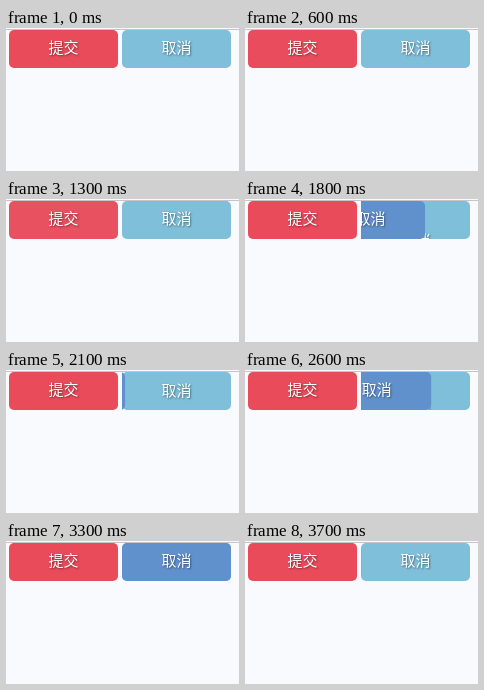
These frames come from a looping animation (233 by 143 pixels, 4200 ms). An HTML page:

```html
<!DOCTYPE html>
<html lang="zh">
<head>
<meta charset="utf-8">
<style>
  html, body { margin: 0; width: 100%; height: 100%; overflow: hidden; background: #f8fafd; }
  svg { display: block; }
  text {
    font: 500 15px "Noto Sans CJK SC", "Noto Sans CJK", sans-serif;
    fill: #fff;
    text-anchor: middle;
    text-shadow: 1px 1px 2px rgba(0, 0, 0, .45);
  }
</style>
</head>
<body>
<svg width="233" height="143" viewBox="0 0 233 143">
  <defs>
    <clipPath id="cancelBox"><rect x="116" y="2" width="109" height="38"/></clipPath>
  </defs>
  <rect width="233" height="143" fill="#f8fafd"/>
  <rect width="233" height="1" y="1" fill="#c8c3c6"/>
  <g id="submit">
    <rect x="3" y="2" width="109" height="38" rx="5" fill="#e94b5b"/>
    <text x="57.5" y="25">提交</text>
  </g>
  <rect x="116" y="2" width="109" height="38" rx="5" fill="#80bfda"/>
  <g clip-path="url(#cancelBox)">
    <text id="label" x="170.5" y="25">取消</text>
    <g id="cover">
      <rect x="116" y="2" width="109" height="38" rx="5" fill="#6191cc"/>
      <text x="170.5" y="25">取消</text>
    </g>
  </g>
</svg>
<script>
const LOOP = 4200, STEP = 100, WIDTH = 109, HEIGHT = 38;
const [button, label, cover] = ['submit', 'label', 'cover'].map(id => document.getElementById(id));
const buttonFill = button.querySelector('rect');

// Each transition: start, from, to, duration
const fade = [[570, 0, 1, 300], [1170, 1, 0, 300]];
const slide = [
  [1698, 0, 1, 300], [1890, .9, 0, 270], [2099, .027, 1, 292],
  [2532, 1, 0, 300], [2933, 0, 1, 300], [3415, 1, 0, 300]
];

const bezier = (u, a, b) => 3 * u * (1 - u) ** 2 * a + 3 * u * u * (1 - u) * b + u ** 3;

// The CSS "ease" curve
function ease(x) {
  if (x <= 0) return 0;
  if (x >= 1) return 1;
  let low = 0, high = 1;
  for (let i = 0; i < 24; i++) {
    const mid = (low + high) / 2;
    if (bezier(mid, .25, .25) < x) low = mid; else high = mid;
  }
  return bezier(low, .1, 1);
}

function valueAt(transitions, t) {
  const current = transitions.filter(([start]) => start <= t).pop();
  if (!current) return 0;
  const [start, from, to, duration] = current;
  return from + (to - from) * ease((t - start) / duration);
}

const mix = (a, b, k) => `rgb(${a.map((c, i) => Math.round(c + (b[i] - c) * k))})`;

function draw(t) {
  buttonFill.setAttribute('fill', mix([233, 75, 91], [228, 96, 107], valueAt(fade, t)));
  const p = valueAt(slide, t);
  cover.setAttribute('transform', `translate(${(p - 1) * WIDTH} 0)`);
  cover.setAttribute('visibility', p > 0 ? 'visible' : 'hidden');
  label.setAttribute('transform', `translate(0 ${p * HEIGHT})`);
}

const origin = performance.now();
function tick() {
  const t = (performance.now() - origin) % LOOP;
  draw(Math.floor(t / STEP) * STEP);
  requestAnimationFrame(tick);
}
tick();
</script>
</body>
</html>
```
